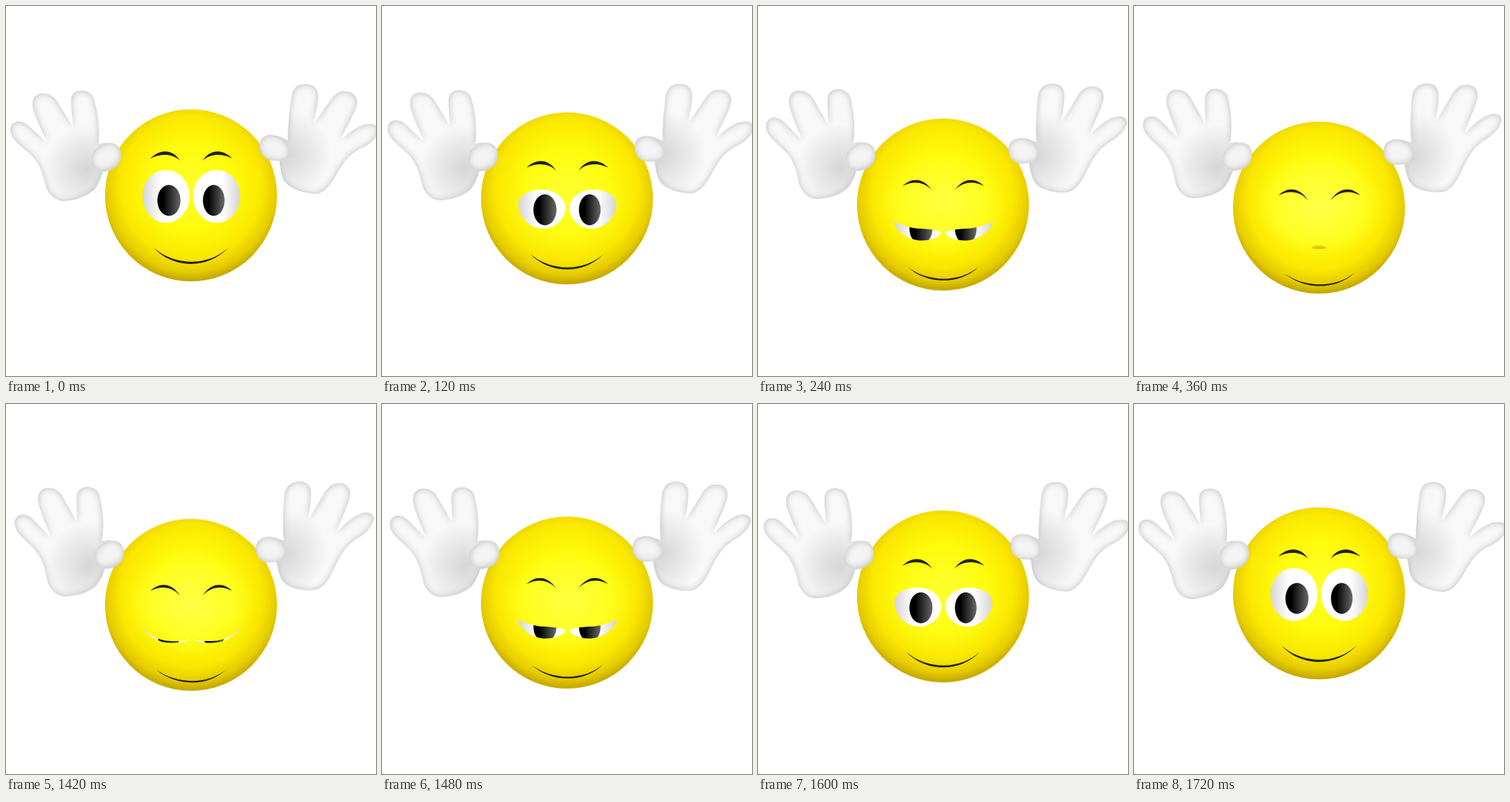
Write an HTML page without scripts that moves like this. It is 512x512 px and loops after 2120 ms.

```html
<!DOCTYPE html>
<html lang="en">
<head>
<meta charset="utf-8">
<title>Smiley closing its eyes</title>
<style>
  html, body { margin: 0; width: 100%; height: 100%; overflow: hidden; background: #fff; }
  svg { display: block; width: 100%; height: 100%; }

  /* Each part goes from --a (awake) to --b (bowed) in sine-spaced steps of 60 ms. */
  .move, .morph, .fade {
    animation: move 2120ms -4ms infinite;
    animation-timing-function: linear(.067 0% 20%, .25 20% 40%, .5 40% 60%, .75 60% 80%, .933 80% 100%);
  }
  .morph { animation-name: morph; d: var(--a); }
  .fade { animation-name: fade; }
  @keyframes move {
    0%, 2.8302%, 81.1321%, 100% { transform: translate(0, 0); }
    16.9811%, 66.9811% { transform: var(--b); }
  }
  @keyframes morph {
    0%, 2.8302%, 81.1321%, 100% { d: var(--a); }
    16.9811%, 66.9811% { d: var(--b); }
  }
  @keyframes fade {
    0%, 2.8302%, 81.1321%, 100% { opacity: 0; }
    16.9811%, 66.9811% { opacity: 1; }
  }
  /* Swaps the eyes for a small crease while they are fully shut. */
  @keyframes shut {
    0%, 66.9811%, 100% { opacity: var(--open); }
    16.9811% { opacity: calc(1 - var(--open)); }
  }
  .eyes, .crease { animation: shut 2120ms -4ms step-end infinite; }
  .eyes { --open: 1; }
  .crease { --open: 0; }

  .head { --b: translateY(17px); }
  .pupil { --b: translateY(52px); }
  .left { --b: translate(1px, -4px) rotate(3deg); transform-origin: 80px 270px; }
  .right { --b: matrix(1, -.145, .072, 1, -1, -.5); transform-origin: 413px 260px; }

  .eye {
    --a: path("M189 263 C189 243 203 227 221.5 227 C240 227 254 243 254 263 C254 283 240 300 221.5 300 C203 300 189 283 189 263Z");
    --b: path("M187 311 C190 316 205 334 224 335 C240 336 250 333 254 330 C250 332 240 333.5 224 332.5 C205 331 190 316 187 311Z");
  }
  .brow {
    --a: path("M200 211 C212 198 230 197 241 214 C230 204 214 204 200 211Z");
    --b: path("M200 262 C211 251 228 249 241 269 C229 255 213 255 200 262Z");
  }
  .mouth {
    --a: path("M204 334 C230 364 280 365 308 334 C280 361 232 360 204 334Z");
    --b: path("M208 370 C235 393 280 394 305 369 C280 391 235 390 208 370Z");
  }
</style>
</head>
<body>
<svg viewBox="0 0 512 512">
  <defs>
    <radialGradient id="skin" cx=".5" cy=".45" r=".55">
      <stop offset="0" stop-color="#ffff2a"/>
      <stop offset=".45" stop-color="#fffb0c"/>
      <stop offset=".75" stop-color="#fbe800"/>
      <stop offset=".9" stop-color="#e6cc00"/>
      <stop offset="1" stop-color="#c0a400"/>
    </radialGradient>
    <radialGradient id="lid">
      <stop offset="0" stop-color="#ffff48"/>
      <stop offset=".6" stop-color="#ffff30" stop-opacity=".8"/>
      <stop offset="1" stop-color="#ffff20" stop-opacity="0"/>
    </radialGradient>
    <linearGradient id="white">
      <stop offset="0" stop-color="#d0d0d0"/>
      <stop offset=".4" stop-color="#fff"/>
    </linearGradient>
    <linearGradient id="black">
      <stop offset=".25" stop-color="#000"/>
      <stop offset="1" stop-color="#686868"/>
    </linearGradient>
    <radialGradient id="glove" gradientUnits="userSpaceOnUse" cx="112" cy="225" r="60">
      <stop offset="0" stop-color="#d6d6d6"/>
      <stop offset="1" stop-color="#f8f8f8"/>
    </radialGradient>
    <radialGradient id="glove2" href="#glove" cx="390" cy="205"/>
    <filter id="soft" color-interpolation-filters="sRGB">
      <feGaussianBlur in="SourceAlpha" stdDeviation="5" result="blur"/>
      <feFlood flood-color="#bababa"/>
      <feComposite in2="blur" operator="out"/>
      <feComposite in2="SourceGraphic" operator="atop"/>
    </filter>
    <clipPath id="eyes">
      <path class="eye morph"/>
      <path class="eye morph" transform="matrix(-1 0 0 1 513 0)"/>
    </clipPath>
  </defs>

  <circle class="head move" cx="256" cy="262" r="119" fill="url(#skin)"/>
  <ellipse class="fade" cx="256" cy="276" rx="92" ry="72" fill="url(#lid)"/>
  <path class="crease" d="M245 335Q251 330 256 332Q261 330 267 335Q256 338 245 335Z" fill="#e0c800"/>

  <g class="eyes">
    <g clip-path="url(#eyes)">
      <rect x="186" y="225" width="70" height="112" fill="url(#white)"/>
      <rect x="186" y="225" width="70" height="112" fill="url(#white)" transform="matrix(-1 0 0 1 513 0)"/>
      <g class="pupil move" fill="url(#black)">
        <ellipse cx="225.5" cy="269" rx="16" ry="21.5"/>
        <ellipse cx="287.5" cy="269" rx="15" ry="21.5"/>
      </g>
    </g>
  </g>

  <g fill="#222208">
    <path class="brow morph"/>
    <g transform="matrix(-1 0 0 1 513 0)"><path class="brow morph"/></g>
    <path class="mouth morph"/>
  </g>

  <g class="left move">
    <path filter="url(#soft)" fill="url(#glove)" d="M92 166C92 152 90 142 90 131C90 121 97 117 105 117C114 117 121 122 123 133C128 152 130 170 128 191C140 187 158 190 159 206C160 222 145 229 134 229C131 240 126 250 122 254C112 264 95 269 80 270C68 270 60 261 56 252C52 238 50 226 40 212C30 200 18 194 10 183C3 172 6 162 15 160C24 159 30 164 37 171L56 188C50 172 42 158 38 144C34 130 40 122 49 121C60 120 68 126 72 134C79 146 86 156 92 166Z"/>
    <path filter="url(#soft)" fill="#f4f4f4" d="M119 218C116 204 124 196 136 191C150 186 160 194 159 208C158 221 148 224 138 227C128 229 121 226 119 218Z"/>
  </g>
  <g class="right move">
    <path filter="url(#soft)" fill="url(#glove2)" d="M390 186C390 165 392 145 395 126C397 112 405 108 414 108C427 108 433 116 432 127C431 140 428 150 426 161C436 150 442 140 450 129C457 119 464 117 471 118C483 119 488 129 485 138C480 155 470 168 464 184C474 176 484 168 496 164C506 162 514 163 516 172C514 184 500 194 489 198C474 206 466 218 458 232C450 246 442 258 430 260C412 260 392 252 386 243C380 234 380 224 378 213C365 216 352 209 351 195C351 180 362 177 372 179C380 180 384 184 390 186Z"/>
    <path filter="url(#soft)" fill="#f4f4f4" d="M351 195C351 181 360 177 371 179C382 181 392 190 393 202C392 212 384 215 372 214C360 214 352 207 351 195Z"/>
  </g>
</svg>
</body>
</html>
```
